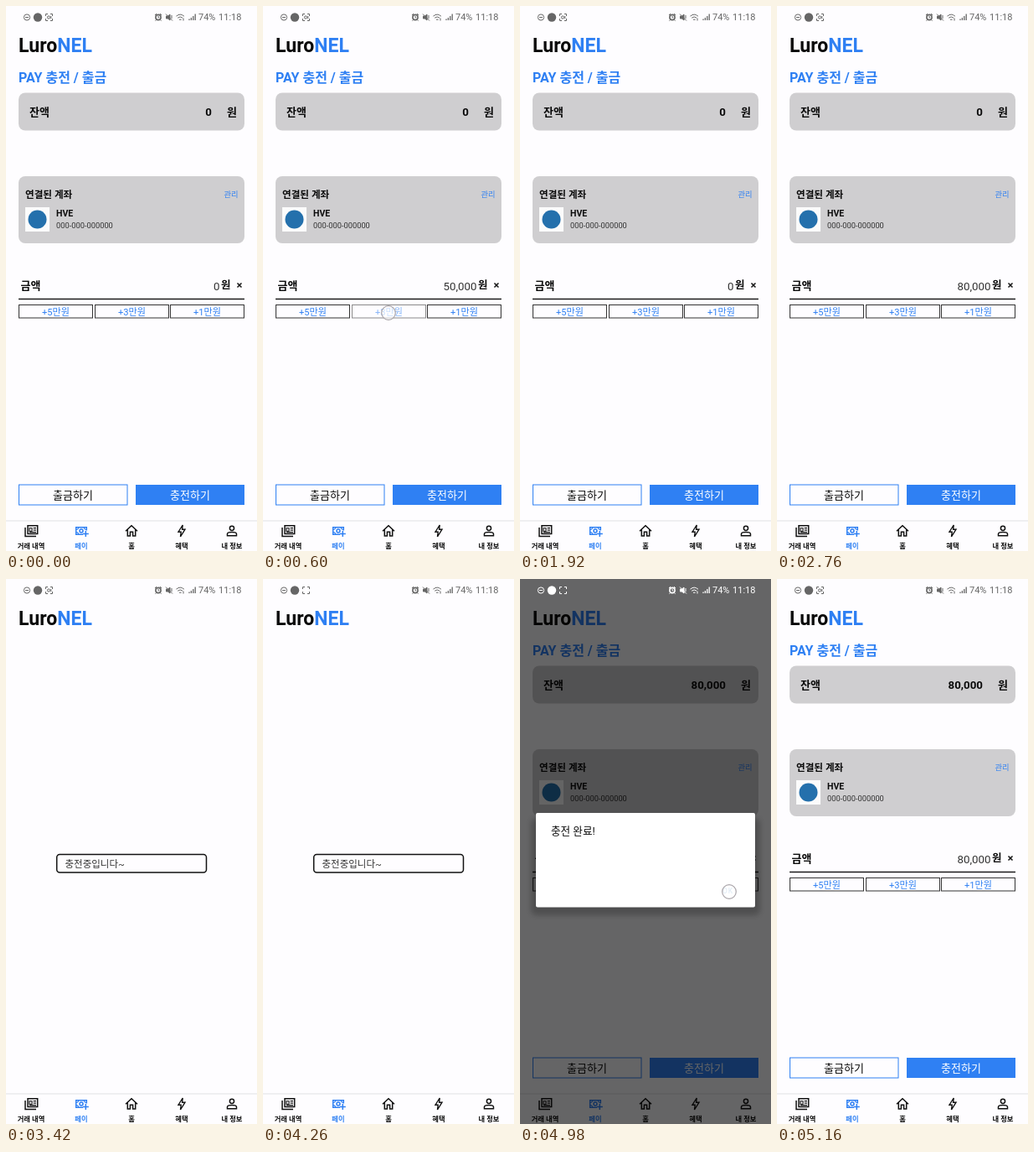
These frames come from a looping animation (300 px wide and 650 px high, 5.46 s). An HTML page:

```html
<!DOCTYPE html>
<html lang="ko">
<head>
<meta charset="utf-8">
<style>
  html, body { margin: 0; width: 100%; height: 100%; overflow: hidden; background: #fefdff; }
  svg { display: block; width: 300px; height: 650px; }
  text { font-family: Roboto, "Noto Sans CJK KR", "Noto Sans CJK", sans-serif; fill: #0a0a0a; white-space: pre; }
  .b { font-weight: 700; }
  .m { font-weight: 500; }
  .blue { fill: #2f80f3; }
  .white { fill: #fff; }
  .soft { fill: #333; }
  .end { text-anchor: end; }
  .mid { text-anchor: middle; }
  .card { fill: #cfced0; }
  .icon { fill: none; stroke: #111; stroke-width: 1.5; }
  .icon.on { stroke: #2f80f3; }
  #status { color: #666; }
  #status text { fill: currentColor; }
  #status .line { fill: none; stroke: currentColor; }
</style>
</head>
<body>
<svg id="stage" viewBox="0 0 300 650"></svg>
<script>
const LOOP = 5460;
const stage = document.getElementById('stage');

const text = (x, y, size, str, cls = '', extra = '') =>
  `<text x="${x}" y="${y}" font-size="${size}" class="${cls}" ${extra}>${str}</text>`;
const box = (x, y, w, h, attrs) => `<rect x="${x}" y="${y}" width="${w}" height="${h}" ${attrs}/>`;
const group = (id, body) => `<g id="${id}">${body}</g>`;
const won = n => n.toLocaleString('en-US');

// [amount, visible from, visible until]
const amounts = [
  [0, 0, 390], [50000, 390, 690], [80000, 690, 990], [90000, 990, 1590],
  [0, 1590, 2190], [50000, 2190, 2610], [80000, 2610, LOOP]
];
const balances = [[0, 0, 3300], [80000, 3300, LOOP]];

// [pressed part, time, x, y]
const presses = [
  ['add5', 240, 61, 366], ['add3', 540, 150, 366], ['add1', 840, 241, 366],
  ['clear', 1440, 279, 334], ['add5', 2040, 62, 366], ['add3', 2460, 151, 366],
  ['charge', 3060, 221, 584], ['ok', 4870, 250, 373]
];

const values = (name, list, x, y, size, cls) => list.map(([n], i) =>
  group(name + i, text(x, y, size, won(n), cls + ' end'))).join('');

const addButton = (id, x, w, label) => group(id,
  box(x + .5, 356.5, w, 15.5, 'fill="none" stroke="#333"') +
  text(x + .5 + w / 2, 368.5, 11.1, label, 'blue mid'));

const page = group('page',
  text(15, 91, 16, 'PAY 충전 / 출금', 'b blue') +
  box(15, 103.5, 270, 45, 'rx="8" class="card"') +
  text(28, 131, 13, '잔액', 'b') +
  values('balance', balances, 246, 131, 13.3, 'b') +
  text(264, 131, 13, '원', 'b') +
  box(15, 203, 270, 80, 'rx="8" class="card"') +
  text(23, 229, 11.6, '연결된 계좌', 'b') +
  text(277.5, 228, 9.3, '관리', 'blue end') +
  box(23, 240, 29, 29, 'fill="#fbfbfb"') +
  '<circle cx="37.5" cy="254.5" r="11" fill="#2470ac"/>' +
  text(60, 251, 10.5, 'HVE', 'b') +
  text(60, 264.5, 9.3, '000-000-000000', 'soft') +
  text(17.5, 338, 13, '금액', 'b') +
  values('amount', amounts, 255.5, 338.5, 13.3, 'soft') +
  text(257, 337, 12.5, '원', 'b') +
  group('clear', '<path d="M276.5 330.5l5 5m0-5l-5 5" stroke="#111" stroke-width="1.5"/>') +
  box(15, 348.8, 270, 1.4, 'fill="#111"') +
  addButton('add5', 15, 88, '+5만원') +
  addButton('add3', 106, 88, '+3만원') +
  addButton('add1', 196, 88, '+1만원') +
  box(15.5, 571, 129.5, 24, 'fill="none" stroke="#2f80f3"') +
  text(80, 587.5, 13, '출금하기', 'mid') +
  group('charge', box(155, 571, 130, 24, 'class="blue"') + text(220, 587.5, 13, '충전하기', 'white mid m')) +
  group('blank', box(0, 242, 300, 372, 'fill="#fefdff"')));

const loading = group('loading',
  box(60.7, 328.5, 178.8, 21.5, 'rx="3.5" fill="none" stroke="#111" stroke-width="1.5"') +
  text(70.5, 343.5, 11.5, '충전중입니다~', 'soft'));

const tab = (x, label, icon, on = '') =>
  `<g class="icon ${on && 'on'}" transform="translate(${x} 626)">${icon}</g>` +
  text(x, 647, 8.3, label, `mid b ${on && 'blue'}`);

const tabs =
  box(0, 613.5, 300, 36.5, 'fill="#fefdff"') +
  box(0, 613.5, 300, 1, 'fill="#e2e2e4"') +
  tab(30, '거래 내역', '<path d="M-7-4V6.5H6M-4-6.3H7.7V3.5H-4Z"/><path d="M-2-3.3H1V.3H-2ZM2.7-3.4H6M2.7-.9H6M-2 1.6H6" stroke-width="1.1"/>') +
  tab(90, '페이', '<path d="M2 4.3H-6.3V-4.3H6.3V-.5M5.3 0V7M1.9 3.5H8.8"/><circle r="2"/><path d="M-6-1.5Q-3.5-1.8-3.3-4M-6 1.5Q-3.5 1.8-3.3 4M6-1.5Q3.5-1.8 3.3-4" stroke-width="1.1"/>', 'on') +
  tab(150, '홈', '<path d="M-7 .2L0-6.2 7 .2M-4.7-1.5V6H-1.6V1.3H1.6V6H4.7V-1.5"/>') +
  tab(210, '혜택', '<path d="M1.2-7L-4 1.2H-.8L-1.5 7 4-1.8H.6Z" stroke-width="1.4"/>') +
  tab(270, '내 정보', '<circle cy="-3.2" r="2.6"/><path d="M-5.5 5.7V3.7C-5.5 .8 5.5 .8 5.5 3.7V5.7Z"/>');

const dialog = group('dialog',
  box(13, 285, 274, 116, 'rx="7" fill="#000" opacity=".22" filter="url(#blur)"') +
  box(19, 279, 262, 112.5, 'rx="2" class="white"') +
  text(37, 305, 12.6, '충전 완료!') +
  group('ok', text(242, 374.5, 8.5, 'OK', 'm', 'letter-spacing=".8" style="fill:#2878b8"')));

const status = group('status',
  '<g class="line"><circle cx="25" cy="13.5" r="3.6"/><path d="M23 13.5h4"/>' +
  '<path d="M47.5 12v-2.5h2.5M53 9.5h2.5v2.5M55.5 15v2.5h-2.5M50 17.5h-2.5v-2.5"/>' +
  '<g id="rec"><circle cx="51" cy="13.5" r="1.6"/><path d="M53.8 12v3"/></g></g>' +
  '<circle cx="38" cy="13.5" r="5.2" fill="currentColor"/>' +
  '<g class="line"><circle cx="182" cy="13.5" r="3.1" stroke-width="1.6"/><path d="M182 11.8v2h1.3M178 11l2-2M186 11l-2-2M179.5 16.5l-1 1.2M184.5 16.5l1 1.2"/>' +
  '<path d="M191.5 12h2l2.5-2v7l-2.5-2h-2Z" fill="currentColor"/><path d="M191 9.5l8 8M198 11v4"/>' +
  '<path d="M203.5 12.2q4.7-4.2 9.4 0M205.2 14.2q3-2.5 6 0M207 16.2h2.6M212 14.5v3"/>' +
  '<path d="M219 17v-1.5M221.4 17v-3M223.8 17v-5M226.2 17v-7.5" stroke-width="1.3"/></g>' +
  text(230, 17, 11, '74%') + text(281.5, 17, 11, '11:18', 'end'));

stage.innerHTML =
  '<filter id="blur" x="-10%" y="-20%" width="120%" height="140%"><feGaussianBlur stdDeviation="3"/></filter>' +
  box(0, 0, 300, 650, 'fill="#fefdff"') +
  '<text x="15" y="55" font-size="23" class="b">Luro<tspan class="blue">NEL</tspan></text>' +
  page + loading + tabs +
  group('dim', box(0, 0, 300, 650, 'fill="#000"')) + dialog + status +
  presses.map(([, , x, y], i) => group('touch' + i,
    `<circle cx="${x}" cy="${y}" r="8.3" fill="#fff" fill-opacity=".55" stroke="#aaa5aa" stroke-width="1.2"/>`)).join('');

// steps: [time, value]; times must rise from 0 to LOOP
function play(id, steps, prop = 'opacity', easing = 'linear') {
  const frames = steps.map(([time, value]) => ({ offset: time / LOOP, [prop]: value, easing }));
  const anim = document.getElementById(id).animate(frames, { duration: LOOP, iterations: Infinity });
  anim.startTime = begin;
}

// Hard switch: "inside" within the span, "outside" elsewhere
function span(id, from, until, inside = 1, outside = 0, prop = 'opacity') {
  const steps = [[0, from > 0 ? outside : inside]];
  if (from > 0) steps.push([from, inside]);
  if (until < LOOP) steps.push([until, outside]);
  steps.push([LOOP, until < LOOP ? outside : inside]);
  play(id, steps, prop, 'steps(1, end)');
}

const begin = document.timeline.currentTime || 0;

amounts.forEach(([, from, until], i) => span('amount' + i, from, until));
balances.forEach(([, from, until], i) => span('balance' + i, from, until));

span('page', 3300, 4430, 0, 1);
span('loading', 3300, 4430);
span('blank', 4430, 4540);
span('rec', 3900, 5070, 0, 1);
span('status', 4430, 5090, '#fff', '#666', 'color');

play('dim', [[0, 0], [4400, 0], [4500, .48], [4620, .6], [4990, .6], [5150, 0], [LOOP, 0]]);
play('dialog', [[0, 0], [4400, 0], [4490, 1], [4990, 1], [5120, 0], [LOOP, 0]]);

const byPart = {};
presses.forEach(([part, time], i) => {
  (byPart[part] ||= []).push(time);
  span('touch' + i, time, time + 140);
});
for (const [part, times] of Object.entries(byPart)) {
  const fade = times.flatMap(t => [[t, 1], [t + 100, .3], [t + 140, .3], [t + 290, 1]]);
  play(part, [[0, 1], ...fade, [LOOP, 1]]);
}
</script>
</body>
</html>
```
